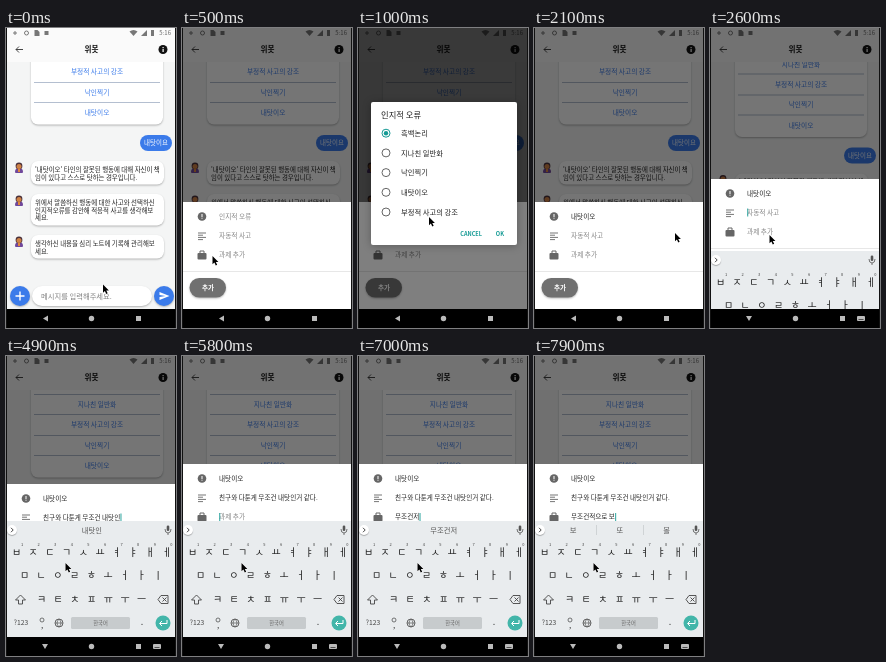
Write an HTML page with a canvas that moves like this. It is 170 px wide and 300 px high and loops after 8000 ms.

```html
<!DOCTYPE html>
<html lang="ko">
<head>
<meta charset="utf-8">
<style>
html, body { margin: 0; width: 100%; height: 100%; overflow: hidden; background: #000; }
canvas { display: block; }
</style>
</head>
<body>
<canvas id="stage" width="170" height="300"></canvas>
<script>
const ctx = document.getElementById('stage').getContext('2d');
const LOOP = 8000, STEP = 100;
const BLUE = '#3b7bea', TEAL = '#159a94', GREY = '#858585', INK = '#222';
const FONT = '"Noto Sans CJK KR", "Noto Sans CJK", "Noto Sans", sans-serif';

const rect = (x, y, w, h, fill) => { ctx.fillStyle = fill; ctx.fillRect(x, y, w, h); };
function round(x, y, w, h, r, fill, shadow = 0) {
  ctx.save();
  if (shadow) { ctx.shadowColor = 'rgba(0,0,0,.28)'; ctx.shadowBlur = shadow; ctx.shadowOffsetY = 1; }
  ctx.fillStyle = fill;
  ctx.beginPath(); ctx.roundRect(x, y, w, h, r); ctx.fill();
  ctx.restore();
}
const disc = (x, y, r, fill, shadow) => round(x - r, y - r, 2 * r, 2 * r, r, fill, shadow);
function ring(x, y, r, color, width = 1) {
  ctx.strokeStyle = color; ctx.lineWidth = width;
  ctx.beginPath(); ctx.arc(x, y, r, 0, 7); ctx.stroke();
}
function path(d, color, width = 0) {
  const p = new Path2D(d);
  if (width) { ctx.strokeStyle = color; ctx.lineWidth = width; ctx.stroke(p); }
  else { ctx.fillStyle = color; ctx.fill(p); }
}
function text(s, x, y, size, color = INK, align = 'left', weight = 400) {
  ctx.font = `${weight} ${size}px ${FONT}`;
  ctx.fillStyle = color; ctx.textAlign = align; ctx.textBaseline = 'alphabetic';
  ctx.fillText(s, x, y + size * 0.36);
  return ctx.measureText(s).width;
}

const clamp = v => Math.max(0, Math.min(1, v));
const ease = (t, from, to) => { const p = clamp((t - from) / (to - from)); return p * p * (3 - 2 * p); };
// Linear track through [time, ...values] points
function track(points, t) {
  let i = 0;
  while (i < points.length - 2 && t >= points[i + 1][0]) i++;
  const [a, b] = [points[i], points[i + 1]];
  const p = clamp((t - a[0]) / (b[0] - a[0]));
  return a.slice(1).map((v, k) => v + (b[k + 1] - v) * p);
}

// Every intermediate state while typing Hangul: consonant, vowel, final
const LEADS = 'ㄱㄲㄴㄷㄸㄹㅁㅂㅃㅅㅆㅇㅈㅉㅊㅋㅌㅍㅎ';
function keystrokes(s) {
  const states = [''];
  let done = '';
  for (const ch of s) {
    const n = ch.charCodeAt(0) - 0xAC00;
    if (n >= 0) {
      states.push(done + LEADS[Math.floor(n / 588)]);
      if (n % 28) states.push(done + String.fromCharCode(0xAC00 + n - n % 28));
    }
    states.push(done += ch);
  }
  return states;
}
function typed(states, marks, t) {
  const points = marks.map(([time, s]) => [time, states.indexOf(s)]);
  return states[Math.floor(track(points, t)[0] + 0.001)];
}
const THOUGHT = '친구와 다툰게 무조건 내탓인거 같다.';
const TASK = '무조건적으로 보';
const thoughtKeys = keystrokes(THOUGHT), taskKeys = keystrokes(TASK);
const thoughtMarks = [[2900, ''], [3300, '친구와'], [4500, '친구와 다툰게 무조건 내타'],
  [4600, '친구와 다툰게 무조건 내타'], [4900, '친구와 다툰게 무조건 내탓인'], [5400, THOUGHT]];
const taskMarks = [[6000, ''], [7800, TASK]];
const GUESSES = {
  친구와: ['친구와', '친구와의', '인구와'],
  무조건: ['무조건', '무조건적인', '무조건이'],
  보: ['보', '또', '볼']
};
const pointer = [[0, 97, 256.5], [200, 16, 267], [400, 16, 267], [600, 45, 189], [800, 45, 189],
  [1000, 71, 189], [1200, 62, 165], [1400, 62, 165], [1700, 141, 205], [2100, 141, 205],
  [2300, 59.5, 207], [8000, 59.5, 207]];

function statusBar() {
  rect(0, 0, 170, 10, '#fafafa');
  const c = '#777';
  path('M7 5h4M9 3v4', c, 1);
  ring(20.5, 5, 2, c);
  path('M28.500 2h3l2 2v4h-5z', c);
  rect(38.5, 3, 4, 4, c);
  path('M123.500 3.500q4-3 8 0l-4 4.500z', c);
  path('M135 8h6v-6z', c);
  rect(145, 2, 3, 6, c);
  text('5:16', 165, 5, 6, '#666', 'right');
}
function header() {
  rect(0, 10, 170, 24, '#fafafa');
  path('M17 21.500h-7M13 18.500l-3 3l3 3', '#333', 0.9);
  text('위봇', 85.5, 21.5, 7.6, '#111', 'center', 700);
  disc(157, 21.5, 4.5, '#111');
  rect(156.5, 19, 1.2, 1.2, '#fff');
  rect(156.5, 21, 1.2, 3, '#fff');
}
function avatar(y) {
  round(9, y, 8, 5, [4, 4, 1, 1], '#70489b');
  disc(13, y - 2, 3.4, '#49303a');
  disc(13, y - 1.4, 2.5, '#cf8145');
  rect(12, y + 1, 2, 3, '#e0873c');
}
function message(y, lines) {
  avatar(y + 7);
  round(25, y, 133, 8 + lines.length * 7.8, 7, '#fff', 2);
  lines.forEach((s, i) => text(s, 29, y + 8.5 + i * 7.8, 6.45));
}
function chat(shift) {
  rect(0, 10, 170, 271, '#f4f5f5');
  ctx.save();
  ctx.translate(0, shift);
  round(25, -40, 132, 136.5, 7, '#fff', 2);
  ['흑백논리', '지나친 일반화', '부정적 사고의 강조', '낙인찍기', '내탓이오'].forEach((s, i) => {
    const y = 3.2 + i * 20.4;
    text(s, 91, y, 6.7, BLUE, 'center');
    if (i < 4) rect(28, Math.floor(y + 10), 126, 1, '#b4bfd0');
  });
  round(134, 107, 32, 16, 8, BLUE);
  text('내탓이요', 150, 115, 6.5, '#fff', 'center');
  message(133, ["'내탓이오' 타인의 잘못된 행동에 대해 자신이 책", '임이 있다고 스스로 탓하는 경우입니다.']);
  message(166, ['위에서 말씀하신 행동에 대한 사고와 선택하신', '인지적오류를 감안해 적응적 사고를 생각해보', '세요.']);
  message(207, ['생각하신 내용을 심리 노트에 기록해 관리해보', '세요.']);
  ctx.restore();
  round(26, 258, 120, 20, 10, '#fff', 2);
  text('메시지를 입력해주세요.', 35, 268, 7.3, '#808080');
  disc(14, 268, 10, BLUE, 2);
  path('M9.500 268h9M14 263.500v9', '#fff', 1.4);
  disc(158, 268, 10, BLUE, 2);
  path('M153.500 264l10 4l-10 4v-3l6-1l-6-1z', '#fff');
}

function field(value, hint, y, focused) {
  const x = 37;
  if (!value) text(hint, x, y, 6.7, GREY);
  const w = value ? text(value, x, y, 6.6) : 0;
  if (!focused) return;
  const word = value.split(' ').pop();
  const u = ctx.measureText(word).width;
  if (word && !word.endsWith('.')) rect(x + w - u, y + 4, u, 0.6, '#555');
  rect(x + 0.3 + w, y - 4, 0.9, 8, TEAL);
}
function sheet(top, picked, thought, task, focus) {
  rect(0, top, 170, 300 - top, '#fff');
  const [a, b, c] = [14.5, 33.5, 53].map(d => top + d);
  disc(20, a, 4.3, '#666');
  rect(19.5, a - 2.5, 1, 3, '#fff');
  rect(19.5, a + 1.2, 1, 1, '#fff');
  field(picked, '인지적 오류', a, false);
  [8, 5, 8, 5].forEach((w, i) => rect(16, b - 3 + i * 2.2, w, 1, '#777'));
  field(thought, '자동적 사고', b, focus === 1);
  round(15.5, c - 2, 9, 6.5, 1, '#666');
  path(`M18 ${c - 2}v-2h4v2`, '#666', 1);
  field(task, '과제 추가', c, focus === 2);
  rect(0, top + 69, 170, 0.7, '#ddd');
  round(7.5, top + 76, 36.5, 19.5, 10, '#707070', 2);
  text('추가', 26, top + 86, 6.5, '#fff', 'center', 700);
}
function dialog(selected) {
  round(13, 74, 146, 143, 2, '#fff', 8);
  text('인지적 오류', 23, 87, 8.3);
  ['흑백논리', '지나친 일반화', '낙인찍기', '내탓이오', '부정적 사고의 강조'].forEach((s, i) => {
    const y = 105.2 + i * 19.7, on = i === selected;
    ring(28, y, 4, on ? TEAL : '#666');
    if (on) disc(28, y, 2.2, TEAL);
    text(s, 43, y, 7.3);
  });
  text('CANCEL', 124, 206, 5.6, TEAL, 'right', 700);
  text('OK', 146, 206, 5.6, TEAL, 'right', 700);
}

function keyboard(offset, word) {
  ctx.save();
  ctx.translate(0, offset);
  rect(0, 165, 170, 116, '#e9ecee');
  disc(6, 174, 5, '#fff', 1);
  path('M5 171.800l2.200 2.200l-2.200 2.200', '#333', 0.9);
  round(160.7, 169.5, 2.6, 5.5, 1.3, '#555');
  path('M159 173q0 4 3 4t3-4M162 177v2', '#555', 0.8);
  const guesses = GUESSES[word] || (word ? ['', word, ''] : []);
  guesses.forEach((s, i) => text(s, 39 + i * 46.8, 174, 7.3, '#555', 'center'));
  if (GUESSES[word]) [62, 109].forEach(x => rect(x, 169, 0.7, 10, '#c5c9cb'));

  const row = (keys, x, y) => [...keys].forEach((k, i) => text(k, x + i * 16.7, y, 10, '#222', 'center', 500));
  row('ㅂㅈㄷㄱㅅㅛㅕㅑㅐㅔ', 10.5, 196);
  [...'1234567890'].forEach((d, i) => text(d, 16 + i * 16.6, 188.5, 4, '#444', 'center', 500));
  row('ㅁㄴㅇㄹㅎㅗㅓㅏㅣ', 18.5, 219.5);
  row('ㅋㅌㅊㅍㅠㅜㅡ', 35.5, 243.5);
  path('M14.500 239l-5 5h3v4h4v-4h3z', '#444', 0.9);
  path('M152 243.500l3-4h7v8h-7zM156.500 241.500l4 4M160.500 241.500l-4 4', '#444', 0.9);
  text('?123', 15, 267, 6.8, '#444', 'center');
  ring(36, 264, 2, '#555', 0.8);
  text(',', 36, 269, 8, '#333', 'center');
  ring(53, 267, 4, '#555', 0.9);
  path('M49 267h8M53 263q-4 4 0 8q4-4 0-8', '#555', 0.7);
  round(65, 261, 59, 12, 1.5, '#c7cbcd');
  text('한국어', 94.5, 267, 5.3, '#666', 'center');
  text('.', 136, 266, 9, '#333', 'center');
  disc(157, 267, 7.5, '#42b5a9');
  path('M161 264v3.500h-7M156 265l-2.500 2.500l2.500 2.500', '#fff', 1);
  ctx.restore();
}
function navBar(typing) {
  rect(0, 281, 170, 19, '#000');
  path(typing ? 'M36 288h6l-3 5z' : 'M42 287.500v6l-5-3z', '#bbb');
  disc(85.5, 290.5, 2.7, '#bbb');
  rect(130, 288, 5, 5, '#bbb');
  if (typing) {
    round(147, 288, 8, 5, 1, '#bbb');
    rect(148.5, 291, 5, 0.8, '#333');
  }
}
function scrim(alpha) { if (alpha) rect(0, 0, 170, 281, `rgba(0,0,0,${alpha})`); }

function draw(t) {
  const open = ease(t, 200, 500), keys = ease(t, 2400, 2800), grow = ease(t, 5500, 5700);
  const modal = ease(t, 700, 900) * (1 - ease(t, 1800, 2100));
  const thought = typed(thoughtKeys, thoughtMarks, t), task = typed(taskKeys, taskMarks, t);
  const focus = t < 2500 ? 0 : t < 5600 ? 1 : 2;

  ctx.clearRect(0, 0, 170, 300);
  chat(25 * keys);
  header();
  statusBar();
  scrim(0.54 * open);
  if (open) sheet(281 - 107 * open - 46 * keys - 20 * grow, t < 1900 ? '' : '내탓이오', thought, task, focus);
  if (keys) keyboard(116 * (1 - keys), (focus === 2 ? task : thought).split(' ').pop().replace('.', ''));
  if (modal) {
    scrim(0.5 * modal);
    ctx.globalAlpha = modal;
    dialog(t < 1300 ? 0 : 3);
    ctx.globalAlpha = 1;
  }
  navBar(keys > 0);
  rect(0, 0, 1, 300, '#111');
  rect(169, 0, 1, 300, '#111');

  const [x, y] = track(pointer, t);
  ctx.save();
  ctx.translate(x, y);
  ctx.scale(0.82, 0.82);
  const arrow = 'M0 0v10l2.300-2.200l1.700 3.700l1.700-.8l-1.700-3.500h3.200z';
  path(arrow, '#fff', 1.2);
  path(arrow, '#000');
  ctx.restore();
}

function tick() {
  draw(Math.floor(performance.now() % LOOP / STEP) * STEP);
  requestAnimationFrame(tick);
}
tick();
</script>
</body>
</html>
```
